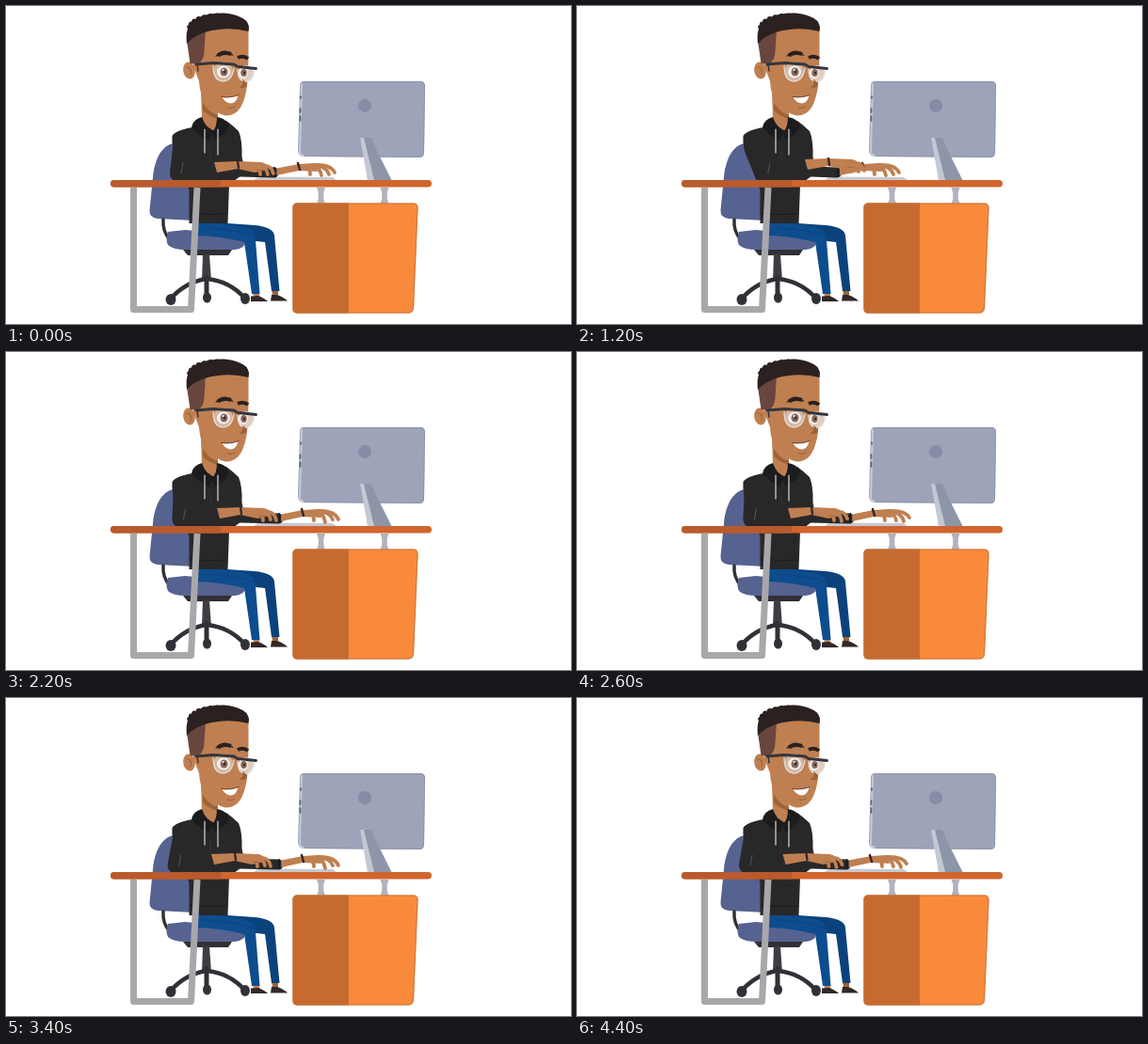
Write an HTML page with a canvas that moves like this. It is 600 px wide and 338 px high and loops after 4500 ms.

```html
<!DOCTYPE html>
<html lang="en">
<head>
<meta charset="utf-8">
<title>Typing at a desk</title>
<style>
html, body { margin: 0; width: 100%; height: 100%; overflow: hidden; background: #fff; }
canvas { display: block; width: 600px; height: 338px; }
</style>
</head>
<body>
<canvas id="stage" width="600" height="338"></canvas>
<script>
const ctx = document.getElementById('stage').getContext('2d');
const LOOP = 4500, STEP = 100;
const SKIN = '#bf7f50', SKIN_DARK = '#9c6238', HOOD = '#292829', HOOD_DARK = '#1c1b1d';
const HAIR = '#2a2120', BLUE = '#566290', JEANS = '#0d4d8e', JEANS_DARK = '#0c427c';
const DARK = '#303136', GREY = '#a8a8ab';

function fill(d, color) {
  ctx.fillStyle = color;
  ctx.fill(new Path2D(d));
}

function line(d, color, width, cap = 'round') {
  ctx.strokeStyle = color;
  ctx.lineWidth = width;
  ctx.lineCap = cap;
  ctx.lineJoin = 'round';
  ctx.stroke(new Path2D(d));
}

function oval(x, y, rx, ry, color, angle = 0) {
  ctx.fillStyle = color;
  ctx.beginPath();
  ctx.ellipse(x, y, rx, ry, angle, 0, Math.PI * 2);
  ctx.fill();
}

function box(x, y, w, h, r, color) {
  ctx.fillStyle = color;
  ctx.beginPath();
  ctx.roundRect(x, y, w, h, r);
  ctx.fill();
}

// Smooth value between [time, value] keys
function track(keys, t) {
  const i = keys.findIndex(k => k[0] > t);
  const [t0, a] = keys[i - 1], [t1, b] = keys[i];
  const u = (t - t0) / (t1 - t0);
  return a + (b - a) * u * u * (3 - 2 * u);
}

const nearKeys = [[0, 246], [600, 257], [1200, 267], [2200, 249], [3000, 249], [3400, 243], [4400, 243.5], [LOOP, 246]];
const farKeys = [[0, 350], [600, 343], [1200, 343], [2200, 354], [3000, 354], [3400, 354], [4400, 351], [LOOP, 350]];

function chair() {
  fill('M181 145C168 147 160 157 156.5 177L152.5 217Q152 225 161 226L200 228L200 145Z', BLUE);
  line('M167 227Q166 240 174 248', DARK, 3.5);
  fill('M172 240Q169 248 172 254Q177 259 191 259L243 259Q254 258 254 250L250 243L190 238Z', BLUE);
  fill('M188 259H240L236 265H193Z', DARK);
  fill('M209 264H216L218 292H208Z', '#3d3e44');
  line('M212 290Q190 294 175 311', DARK, 4.5);
  line('M214 290Q238 293 253 310', DARK, 4.5);
  line('M213 288V306', DARK, 5);
  oval(175, 312, 5.5, 6, DARK);
  oval(254, 311, 5, 6, DARK);
  oval(213.5, 310, 4.5, 5.5, DARK);
}

function legs() {
  fill('M282 301L289 301L289 307L283 307Z', SKIN_DARK);
  fill('M262 304L269 304L269 309L263 309Z', SKIN);
  fill('M206 229L264 233Q284 235 285 244L290.5 303L282 303L275 251L230 246Z', JEANS_DARK);
  fill('M204 230Q235 231 252 235Q266 238 265 249L269.5 306L261 306L253 251Q230 245 204 244Z', JEANS);
  line('M212 236Q250 238 265 245', JEANS_DARK, 1);
  fill('M282 307L288 307Q296 310 299 313.5L281 313.5Z', '#332827');
  fill('M260 308.5L268 308Q275 311 278 314L260 314Z', '#332827');
}

function torso() {
  fill('M198 129Q180 132 176.5 138Q175.5 151 181 162L190 184L194.5 196L194.5 231L235.5 231L237 190L250 180L250.5 160Q251 142 247 133Q241 127 234 122Z', HOOD);
  line('M195 220Q215 223 235 221', HOOD_DARK, 1);
  line('M217 150V194', '#3b393a', 0.8);
}

function collar() {
  fill('M207 92L208 120L212 127L221 133L225 126V112Z', SKIN);
  fill('M209 103Q216 114 225 116L224 120Q214 116 209 111Z', SKIN_DARK);
  fill('M208 118Q198 121 197 129Q203 137 215 143L221 133Q212 130 208 118Z', HOOD_DARK);
  fill('M224 118Q233 119 237 127Q235 136 221 143L219 134Q224 129 224 118Z', HOOD_DARK);
  line('M211 131V156M225 131V158', '#d9d9dc', 1.2);
}

function head() {
  oval(194.5, 68.5, 6.3, 9, SKIN, -0.15);
  line('M192 65Q198 65 196 73', SKIN_DARK, 1.2);
  fill('M202 22H257.5L257.5 54L256.5 80Q255 98 249 108Q243 117 233 116.5Q222 114 212 103Q206 96 205 80L199 64Z', SKIN);
  fill('M192 37L212 25L210.5 48Q210 59 203 62L195.5 61Z', '#68463e');
  fill('M192 40Q190 23 198 17Q207 9 221 8Q236 6 247 11Q257 14 258 23L257.5 27Q235 21 211 28Q199 32 192 40Z', HAIR);
  for (let i = 0; i < 13; i++) {
    const a = Math.PI * (1.04 + i * 0.075);
    oval(225 + 30 * Math.cos(a), 24 + 14 * Math.sin(a), 3, 2.6, HAIR);
  }
  fill('M222 54Q226 47 233 47.5Q239 49 242 53Q232 50 222 54Z', HAIR);
  line('M225 52.5Q231 48.5 239 51M246 55Q252 52 257 56', HAIR, 4, 'butt');
  oval(230.5, 70, 10.5, 10.5, '#d3b7a1');
  oval(254.5, 72, 8.5, 9, '#dfcdbf');
  oval(231, 70, 7, 6.5, '#f3efec');
  oval(252, 71, 5, 6, '#f3efec');
  oval(231.5, 70, 4, 4.5, '#8a685a');
  oval(252.5, 71, 3.2, 4, '#8a685a');
  oval(232, 70, 1.5, 1.8, '#3b2e2c');
  oval(253, 71, 1.2, 1.6, '#3b2e2c');
  oval(230.5, 68, 1, 1, '#fff');
  line('M220 63Q220 79 230 80Q240 80 242 66M246 67Q246 80 255 80.5Q262 79 264 68', '#e2e1e1', 1.2);
  line('M202 62L220 60.5L242 62L246 64.5L265.5 66.5', '#34353d', 2.8);
  line('M203 62L204 69', '#34353d', 1.5);
  fill('M251 78Q258 82 255 86Q251 88 247 86Q253 85 251 78Z', SKIN_DARK);
  fill('M229.5 97Q240 98 246.5 94.5Q245 103 239 103.5Q233 103 229.5 97Z', '#fff');
  line('M229 96.5Q239 98 247 94.5', '#693528', 0.9);
  line('M235 108Q239 110 243 107', SKIN_DARK, 1);
}

function finger(x, y, len, drop) {
  line(`M${x} ${y}Q${x + len * 0.8} ${y - 1} ${x + len} ${y + drop}`, SKIN, 3.8);
}

function farArm(x, beat) {
  const cuff = x - 64 + (x - 343) * 0.2;
  const wrist = x - 39;
  line(`M241 148L249 176L${cuff - 3} 177`, HOOD, 11);
  line(`M${cuff - 2} 172V181`, HOOD_DARK, 2);
  fill(`M${cuff} 172.5L${wrist} 168L${wrist + 16} 167L${wrist + 20} 176L${wrist} 175L${cuff} 180Z`, SKIN);
  finger(wrist + 9, 173, 3, 6);
  finger(wrist + 14, 171, 10, 9 + beat);
  finger(wrist + 15, 170, 17, 9 - beat);
  finger(wrist + 16, 169, 22, 8 + beat);
  line(`M${wrist - 1} 167L${wrist + 1} 174`, '#38272a', 2.5);
}

function nearArm(x, beat) {
  const y = 168 - Math.max(0, Math.min(3, (x - 249) / 2.5));
  const elbow = 183 + (x - 246) * 0.8;
  const cuff = x - 22;
  line(`M187 143L${elbow} 178`, HOOD, 18);
  line(`M${elbow} 179L${cuff - 4} ${y + 5}`, HOOD, 14);
  line(`M${elbow + 5} 167L${elbow + 3} 178`, '#565459', 1);
  fill(`M${cuff - 3} ${y - 2}L${x} ${y - 3}L${x + 25} ${y - 2}Q${x + 33} ${y - 1} ${x + 31} ${y + 6}L${x + 18} ${y + 9}L${x} ${y + 5}L${cuff} ${y + 9}Z`, SKIN);
  finger(x + 20, y + 4, 4, 7);
  finger(x + 24, y + 3, 8, 8 + beat);
  finger(x + 27, y + 2, 11, 8 - beat);
  line(`M${x + 20} ${y + 6}L${x + 27} ${y + 7}`, SKIN_DARK, 0.8);
  line(`M${x} ${y - 3}L${x + 1} ${y + 4}`, '#38272a', 2.3);
}

function monitor() {
  fill('M316 80H440Q445 80 445 85L444 156Q444 161 439 161L316 160Q310 159 310 153L312 85Q312 80 316 80Z', '#9da3b8');
  line('M314 83L312 155Q312 158 316 159', '#c5c9d5', 2);
  line('M313 96V98M312.5 109V113M312.5 117V122', '#5d6375', 1.7);
  line('M316 80.5H440Q444.5 80.5 444.5 85L443.5 156Q443 160.5 439 160.5L317 159.5', '#8990a7', 0.8);
  oval(381, 106, 7, 7, '#858ca3');
  fill('M376 140H388L392 150L409.5 185H384L383 165Z', '#8d95a9');
  fill('M376 140L380 140L391 185H384Z', '#c3c8d4');
}

function desk() {
  line('M135.5 193V322.5H196.5L203 193', GREY, 7, 'butt');
  for (const x of [334.5, 402]) {
    fill(`M${x - 4.5} 193H${x + 4.5}L${x + 2.8} 198V205L${x + 4.5} 210H${x - 4.5}L${x - 2.8} 205V198Z`, '#b0b3bd');
  }
  fill('M309 209.5H433Q437.5 209.5 437.5 215L433 321Q432.5 326.5 427 326.5H309Q304.5 326.5 304.5 322V214Q304.5 209.5 309 209.5Z', '#fa8a3b');
  fill('M309 209.5H364V326.5H309Q304.5 326.5 304.5 322V214Q304.5 209.5 309 209.5Z', '#c56b2f');
  line('M309 210H433Q437 210 437 215L432.5 321Q432 326 427 326H309Q305 326 305 322V214Q305 210 309 210Z', '#bd7442', 0.9);
  box(111, 185, 341, 7.5, 3.7, '#d0652e');
  box(111, 185, 117, 7.5, [3.7, 0, 0, 3.7], '#b95a2c');
}

function draw(t) {
  const near = track(nearKeys, t), far = track(farKeys, t);
  const beat = Math.sin(t / LOOP * Math.PI * 30);
  ctx.fillStyle = '#fff';
  ctx.fillRect(0, 0, 600, 338);
  chair();
  legs();
  torso();
  collar();
  head();
  monitor();
  fill('M268 181.5L347 182L351 185H263Z', '#c6c9cf');
  farArm(far, beat);
  nearArm(near, -beat);
  desk();
}

const start = performance.now();
function tick() {
  const t = (performance.now() - start) % LOOP;
  draw(Math.floor(t / STEP) * STEP);
  requestAnimationFrame(tick);
}
tick();
</script>
</body>
</html>
```
